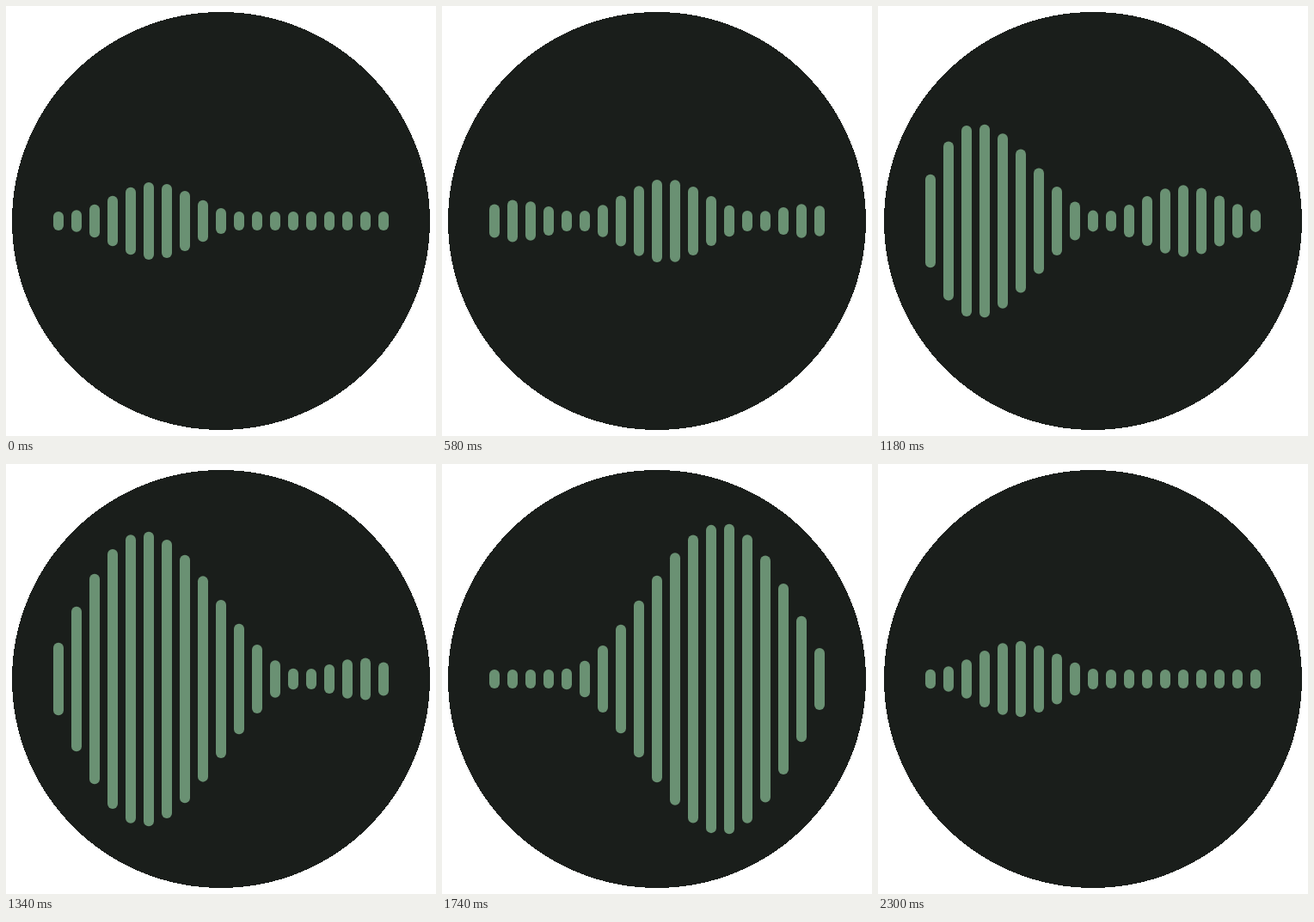
Recreate the animation shown at these times as an HTML page. Size 500 by 500 pixels, loop 2320 ms.

```html
<!DOCTYPE html>
<html>
<head>
<meta charset="utf-8">
<style>
  html, body { margin: 0; width: 100%; height: 100%; overflow: hidden; background: #fff; }
  svg { display: block; width: 100vw; height: 100vh; }
</style>
</head>
<body>
<svg viewBox="0 0 500 500">
  <circle cx="250" cy="250" r="243" fill="#1a1e1b" shape-rendering="crispEdges"/>
  <g id="bars" fill="#6a9173"></g>
</svg>
<script>
const LOOP = 2320, STEP = 20, STAGGER = 40, COUNT = 19;
const REST = 22, WIDTH = 12, PITCH = 21;

// Full swing of each bar, from the outer edge to the middle
const swing = [87, 173.5, 237, 282, 316, 341, 358, 371, 378, 380.5];

const group = document.getElementById('bars');
const bars = Array.from({ length: COUNT }, (_, i) => {
  const bar = document.createElementNS('http://www.w3.org/2000/svg', 'rect');
  bar.setAttribute('x', 55 + i * PITCH);
  bar.setAttribute('width', WIDTH);
  bar.setAttribute('rx', WIDTH / 2);
  return group.appendChild(bar);
});

// Eased rise and fall for u from 0 to 1
function pulse(u) {
  const x = 1 - Math.abs(2 * u - 1);
  return x * x * (3 - 2 * x);
}

// Three small pulses, one large one, then rest
function level(t) {
  if (t < 1200) return 0.2 * pulse(t % 400 / 400);
  if (t < 2000) return pulse((t - 1200) / 800);
  return 0;
}

function draw(now) {
  const time = Math.floor(now % LOOP / STEP) * STEP;
  bars.forEach((bar, i) => {
    const local = (time + 400 - i * STAGGER + LOOP) % LOOP;
    const height = REST + swing[Math.min(i, COUNT - 1 - i)] * level(local);
    bar.setAttribute('y', 250 - height / 2);
    bar.setAttribute('height', height);
  });
}

const start = performance.now();
function tick() {
  draw(performance.now() - start);
  requestAnimationFrame(tick);
}
tick();
</script>
</body>
</html>
```
